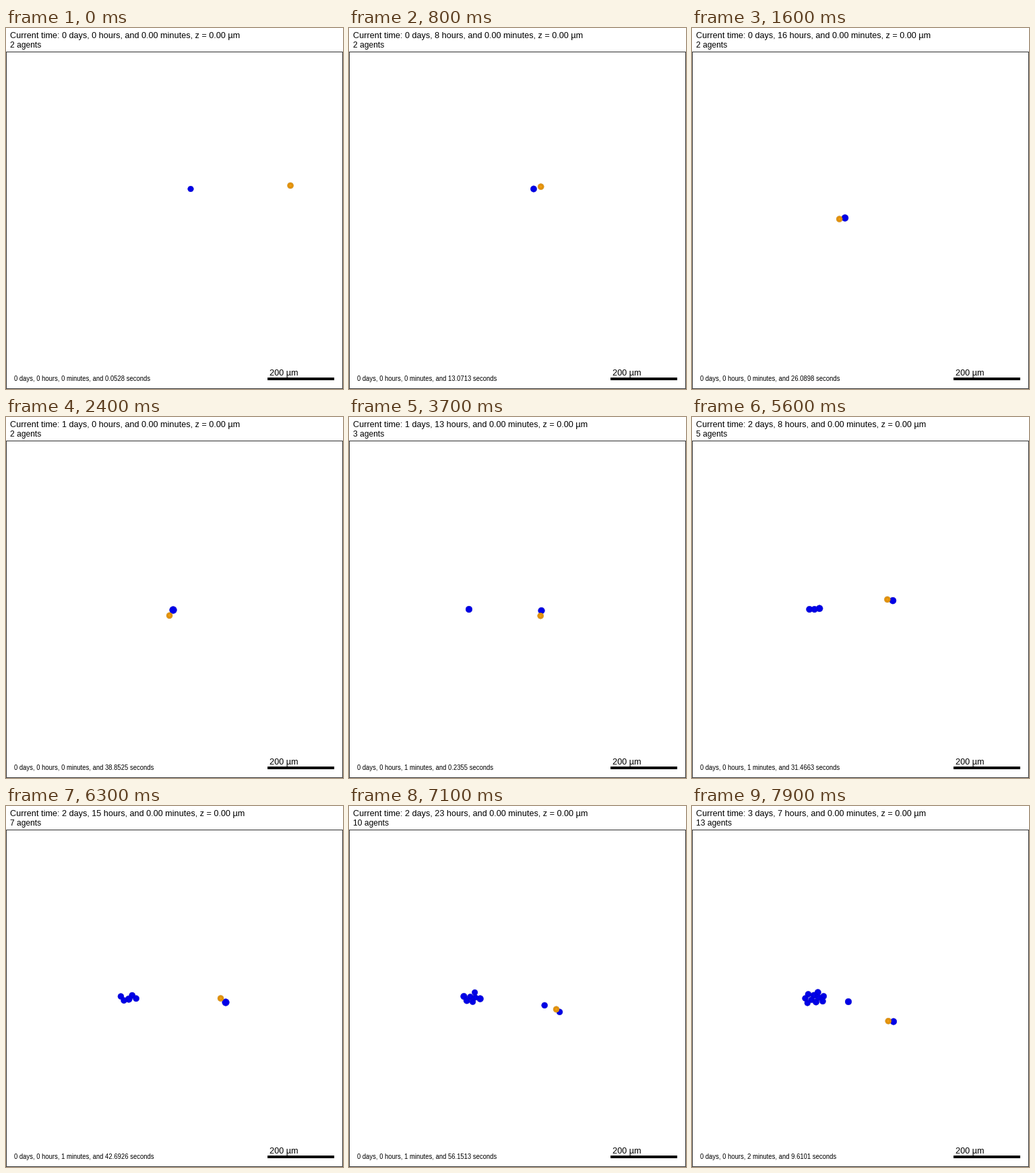
Animation, 500 px wide and 535 px high, one loop 8 s. Source, as a matplotlib script:

```python
import numpy as np
import matplotlib.pyplot as plt
from matplotlib.animation import FuncAnimation
from matplotlib.patches import Circle, Rectangle

W, H, DPI = 500, 535, 100
FRAMES, INTERVAL = 80, 100
PX = 72 / DPI
FONT = 12.5 * 1.014

BLUE = ("#0000ee", "#0000b8")
ORANGE = ("#f09c10", "#a86c08")

HOME = np.array([178.0, 285.0])   # where shed cells gather
SPEED, GAP = 7.3, 7.5             # px per hour, spacing of touching cells
MEET = 9                          # hour the worker reaches its cell
SHED = (0, 25, 41, 67)            # hours the carried cell is renewed
SPLITS = (46, 57, 59, *range(69, 78, 2))

ROUTE = [(0, 274, 238.5), (MEET, 274, 238.5), (16, 227, 281.5), (24, 248, 286),
         (37, 285.5, 287), (48, 266, 250.5), (63, 326, 291), (79, 299, 319.5)]
RUN_TIME = [(0, 0.0528), (16, 26.0898), (24, 38.8525), (37, 60.2355),
            (48, 78.6363), (63, 102.6926), (79, 129.6101)]


def along(points, t):
    """Interpolate (hour, value, ...) points at hour t."""
    hours, *values = zip(*points)
    return np.array([np.interp(t, hours, v) for v in values])


def radius(age):
    return 4.3 + min(0.045 * age, 1.1)


def carried_radius(t):
    return radius(t - max(s for s in SHED if s <= t))


def grip(t):
    """Place of the worker beside its cell, swinging slowly around it."""
    angle = np.radians(160 - 63 * np.cos(np.pi * (t - 34) / 33))
    reach = 8 + 4 * (carried_radius(t) - 4.9)
    return along(ROUTE, t) + reach * np.array([np.cos(angle), np.sin(angle)])


def worker(t):
    start = np.array([422, 233.5])
    return start + (grip(MEET) - start) * t / MEET if t < MEET else grip(t)


class Cell:
    def __init__(self, born, pos):
        self.born, self.pos, self.age = born, np.array(pos), 0
        self.track = []

    def approach(self, others):
        """Head home until touching another cell."""
        way = HOME - self.pos
        far = np.hypot(*way)
        room = [np.hypot(*(o.pos - self.pos)) - GAP for o in others]
        step = max(0, min([SPEED, far, *room]))
        if step:
            self.pos = self.pos + way * step / far

    def split(self, t, angle):
        half = GAP / 2 * np.array([np.cos(angle), np.sin(angle)])
        twin = Cell(t, self.pos + half)
        self.pos, self.age = self.pos - half, 0
        return twin


def push_apart(cells):
    for _ in range(12):
        for i, a in enumerate(cells):
            for b in cells[:i]:
                way = a.pos - b.pos
                dist = np.hypot(*way)
                if dist < GAP:
                    shift = way / dist * (GAP - dist) / 2
                    a.pos, b.pos = a.pos + shift, b.pos - shift


def grow_colony():
    cells = []
    for t in range(FRAMES):
        for c in cells:
            c.age += 1
            c.approach([o for o in cells if o is not c])
        if t in SHED[1:]:
            cells.append(Cell(t, along(ROUTE, t)))
        if t in SPLITS:
            oldest = max(cells, key=lambda c: c.age)
            cells.append(oldest.split(t, 0.35 * SPLITS.index(t)))
        push_apart(cells)
        for c in cells:
            c.track.append((c.pos, radius(c.age)))
    return cells


plt.rcParams["font.family"] = "Liberation Sans"
fig = plt.figure(figsize=(W / DPI, H / DPI), dpi=DPI, facecolor="white")
ax = fig.add_axes([0, 0, 1, 1])
ax.set_xlim(0, W)
ax.set_ylim(H, 0)
ax.axis("off")


def label(x, y, scale=1.0, text=""):
    return ax.text(x, y, text, fontsize=FONT * scale * PX, color="black",
                   va="baseline", ha="left")


class Disc:
    """A cell body with its nucleus."""

    def __init__(self, colors, z):
        fill, edge = colors
        self.parts = [ax.add_patch(Circle((0, 0), 1, facecolor=fill, edgecolor=edge,
                                          linewidth=0.4 * PX, zorder=z))
                      for _ in range(2)]

    def show(self, pos, r):
        for part, scale in zip(self.parts, (1, 0.58)):
            part.set_visible(True)
            part.center = pos
            part.set_radius(r * scale)

    def hide(self):
        for part in self.parts:
            part.set_visible(False)


colony = [(cell, Disc(BLUE, 3)) for cell in grow_colony()]
carried_disc = Disc(BLUE, 4)
worker_disc = Disc(ORANGE, 5)

ax.add_patch(Rectangle((0.5, 35.5), W - 1, H - 36, fill=False, snap=False,
                       edgecolor="#303030", linewidth=PX))
ax.add_patch(Rectangle((388, 518), 99, 4, facecolor="black", linewidth=0, snap=False))
label(391, 515, text="200 µm")

clock_text = label(6.25, 15)
count_text = label(6.25, 28.5, 0.95)
run_text = label(12.5, 523, 0.755)


def update(t):
    agents = 2
    for cell, disc in colony:
        if t >= cell.born:
            disc.show(*cell.track[t - cell.born])
            agents += 1
        else:
            disc.hide()
    carried_disc.show(along(ROUTE, t), carried_radius(t))
    worker_disc.show(worker(t), 4.5)

    day, hour = divmod(t, 24)
    clock_text.set_text(f"Current time: {day} days, {hour} hours, "
                        "and 0.00 minutes, z = 0.00 µm")
    count_text.set_text(f"{agents} agents")
    minutes, seconds = divmod(along(RUN_TIME, t)[0], 60)
    run_text.set_text(f"0 days, 0 hours, {int(minutes)} minutes, "
                      f"and {seconds:.4f} seconds")
    return []


anim = FuncAnimation(fig, update, frames=FRAMES, interval=INTERVAL,
                     repeat=True, repeat_delay=0, blit=False)
plt.show()
```
